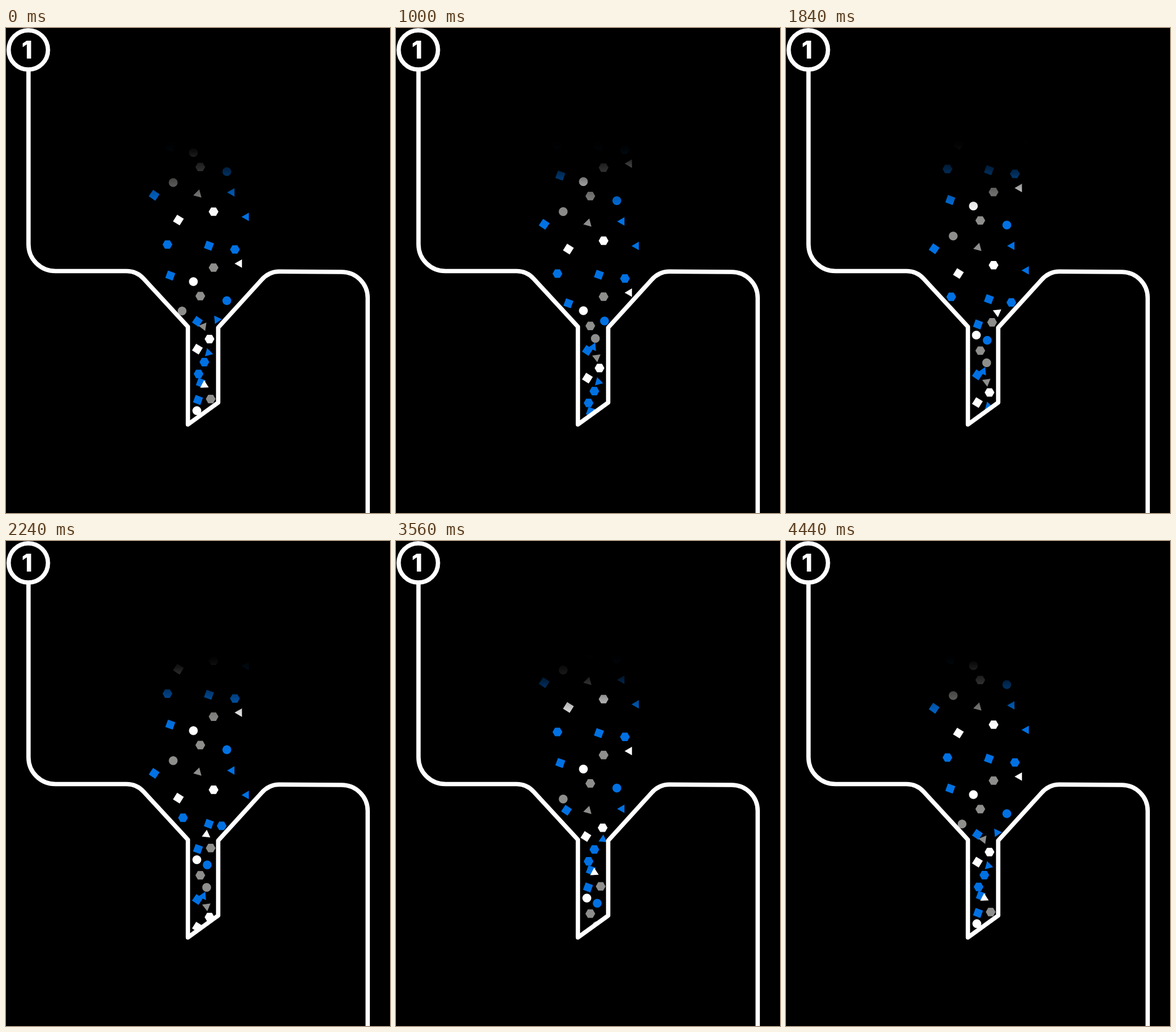
Write an HTML page that moves like this. It is 666x841 px and loops after 4.48 s.

```html
<!DOCTYPE html>
<html lang="en">
<head>
<meta charset="utf-8">
<title>Funnel</title>
<style>
  html, body { margin: 0; width: 100%; height: 100%; overflow: hidden; background: #000; }
  svg { display: block; width: 100vw; height: 100vh; }
  text { font: 800 43px Inter, "Open Sans", sans-serif; fill: #fff; text-anchor: middle; }
  .line { fill: none; stroke: #fff; stroke-width: 7.5; stroke-linejoin: round; }
</style>
</head>
<body>
<svg viewBox="0 0 666 841">
  <defs>
    <clipPath id="inside"><path d="M200 150H460V649H368L315 688H200Z"/></clipPath>
    <linearGradient id="fade" gradientUnits="userSpaceOnUse" x1="0" y1="195" x2="0" y2="330"></linearGradient>
  </defs>
  <g id="particles" clip-path="url(#inside)"></g>
  <rect x="225" y="140" width="220" height="190" fill="url(#fade)"/>
  <circle class="line" cx="38.7" cy="38" r="34.1"/>
  <path class="line" d="M39 72V375C39 401 60 421.5 86 421.5H209Q227 421.5 239 435L315.5 518V687.5L368 649.5V519.5L443 437Q456 422.3 474 422.3L582 423C607 423 627.3 443 627.3 468V845"/>
  <text x="36.5" y="53">1</text>
</svg>
<script>
const NS = 'http://www.w3.org/2000/svg';
const BLUE = '#0071e3', GRAY = '#8e8e8c', WHITE = '#fff';
const FRAME = 40, LOOP = 4480, CYCLE = 4.44;
const FALL = 50.4;      // px per second
const CENTER = 342;     // middle of the neck
const WALL_SLOPE = 1.085;
const ROLL = 2.5;       // degrees a triangle turns per px of sideways slide

const fade = document.getElementById('fade');
const group = document.getElementById('particles');
const particles = [];

function make(parent, tag, attributes) {
  const node = document.createElementNS(NS, tag);
  for (const key in attributes) node.setAttribute(key, attributes[key]);
  return parent.appendChild(node);
}

function polygon(sides, radius, turn = 0) {
  return 'M' + Array.from({ length: sides }, (_, i) => {
    const a = turn + i * 2 * Math.PI / sides;
    return `${(radius * Math.cos(a)).toFixed(2)} ${(radius * Math.sin(a)).toFixed(2)}`;
  }).join('L') + 'Z';
}

const SHAPES = {
  circle: polygon(48, 7.6),
  hexagon: polygon(6, 8.5),
  square: polygon(4, 9.6, Math.PI / 4),
  triangle: polygon(3, 8.5)
};

// Falls at x = home, slides along the wall to x = lane by the depth "settle";
// slip is the height gained or lost on the slide
function particle(shape, color, { home, depth, lane, settle = 525, slip = 0, angle = 0 }) {
  const touch = Math.min(490, 529 - WALL_SLOPE * Math.abs(home - CENTER));
  const roll = shape === 'triangle' ? ROLL : 0;
  const nodes = Array.from({ length: 4 }, () => make(group, 'path', { d: SHAPES[shape], fill: color }));

  particles.push(time => nodes.forEach((node, i) => {
    const y = depth + FALL * (time + (i - 1) * CYCLE);
    const slide = Math.min(Math.max((y - touch) / (settle - touch), 0), 1);
    const shift = (lane - home) * slide;
    node.setAttribute('transform',
      `translate(${home + shift} ${y + slip * slide}) rotate(${angle + roll * shift})`);
  }));
}

particle('square', BLUE, { home: 285, depth: 205.5, lane: 333, settle: 510, slip: -8, angle: 20 });
particle('circle', WHITE, { home: 325, depth: 216, lane: 331, settle: 540 });
particle('hexagon', GRAY, { home: 337, depth: 241, lane: 337, slip: 2 });
particle('circle', BLUE, { home: 383, depth: 249, lane: 349, settle: 546, slip: -24 });
particle('circle', GRAY, { home: 290, depth: 268, lane: 348, settle: 545, slip: -4 });
particle('square', BLUE, { home: 257, depth: 290, lane: 332, settle: 500, slip: -5, angle: 34 });
particle('triangle', GRAY, { home: 333, depth: 288, lane: 348, slip: 9, angle: 45 });
particle('triangle', BLUE, { home: 392, depth: 285, lane: 342, settle: 540, slip: -6, angle: 60 });
particle('square', WHITE, { home: 299, depth: 333, lane: 332, settle: 515, angle: 32 });
particle('hexagon', WHITE, { home: 360, depth: 318.5, lane: 353, slip: -3 });
particle('triangle', BLUE, { home: 417, depth: 327.5, lane: 351, settle: 515, slip: 12, angle: 60 });
particle('hexagon', BLUE, { home: 280, depth: 375.5, lane: 344, slip: -20 });
particle('square', BLUE, { home: 352, depth: 377.5, lane: 338, slip: 14, angle: 20 });
particle('hexagon', BLUE, { home: 397, depth: 384, lane: 334, settle: 545, slip: -8 });
particle('hexagon', GRAY, { home: 360, depth: 415.5, lane: 355, slip: 4 });
particle('triangle', WHITE, { home: 405, depth: 408.5, lane: 344, slip: -13, angle: 60 });

for (let u = 0; u <= 1; u += 1 / 16) {
  make(fade, 'stop', { offset: u, 'stop-color': '#000', 'stop-opacity': 1 - u * u * (3 - 2 * u) });
}

function draw(ms) {
  const time = Math.min(Math.floor(ms % LOOP / FRAME) * FRAME / 1000, CYCLE);
  particles.forEach(place => place(time));
}

const begin = performance.now();
function tick() {
  draw(performance.now() - begin);
  requestAnimationFrame(tick);
}
tick();
</script>
</body>
</html>
```
